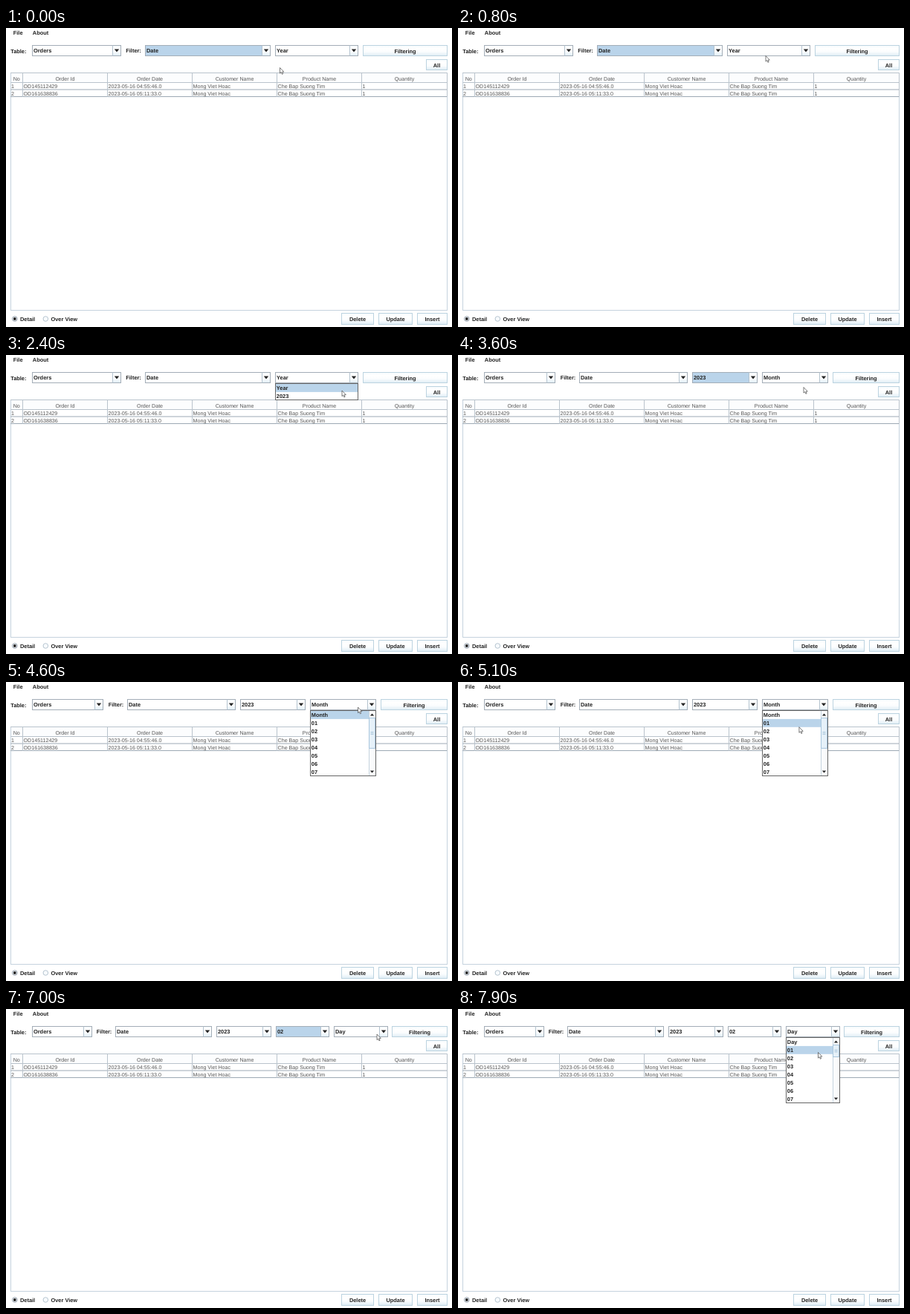
These frames come from a looping animation (600 by 403 pixels, 8 s). An HTML page with a canvas:

```html
<!DOCTYPE html>
<html lang="en">
<head>
<meta charset="utf-8">
<title>Order filter</title>
<style>
html, body { margin: 0; width: 100%; height: 100%; overflow: hidden; background: #fff; }
canvas { display: block; }
</style>
</head>
<body>
<canvas id="stage" width="600" height="403"></canvas>
<script>
const ctx = document.getElementById('stage').getContext('2d');
const LOOP = 8000, STEP = 100, ROW = 10.9;
const INK = '#222', EDGE = '#a3adb7', SELECT = '#bad4ea', PALE = '#c6d3de';
const BOLD = 'bold 7.4px "Liberation Sans", Arial, sans-serif';
const PLAIN = '7.1px "Liberation Sans", Arial, sans-serif';

// Cursor path: time, x, y
const PATH = [
  [0, 368.5, 53.5], [800, 414, 37.5], [1600, 467, 31], [1800, 467, 32],
  [2400, 452, 48], [2900, 441, 56], [3100, 441, 56], [4100, 489, 31],
  [4300, 489, 31], [4600, 473.5, 34], [5200, 456, 66], [5500, 457, 65],
  [7000, 499, 34], [7200, 505, 31], [7400, 505, 32], [7900, 484.5, 58.5]
];

// Each layout: combos as [text, left, right], filter label x, left edge of the button
const LAYOUTS = [
  { combos: [['Orders', 35, 155], ['Date', 187, 356], ['Year', 362, 474]], label: 161.3, button: 480 },
  { combos: [['Orders', 35, 131], ['Date', 163, 309], ['2023', 315, 403], ['Month', 409, 498]], label: 137.7, button: 504 },
  { combos: [['Orders', 35, 116], ['Date', 147, 277], ['2023', 283, 357], ['02', 363, 435], ['Day', 441, 514]], label: 121.8, button: 519 }
];

// Start time, layout, focused combo, open list, total number of items
const STATES = [
  [0, 0, 1], [1700, 0, -1, ['Year', '2023'], 2], [3000, 1, 2],
  [4200, 1, -1, numbered('Month'), 13], [5300, 2, 3], [7300, 2, -1, numbered('Day'), 32]
];

const COLUMNS = [6, 22.5, 136.5, 250.5, 364.5, 478.5, 593.5];
const HEADERS = ['No', 'Order Id', 'Order Date', 'Customer Name', 'Product Name', 'Quantity'];
const ROWS = [
  ['1', 'OD145112429', '2023-05-16 04:55:46.0', 'Mong Viet Hoac', 'Che Bap Suong Tim', '1'],
  ['2', 'OD161638836', '2023-05-16 05:11:33.0', 'Mong Viet Hoac', 'Che Bap Suong Tim', '1']
];

function numbered(first) {
  return [first, ...Array.from({ length: 7 }, (_, i) => '0' + (i + 1))];
}

function text(s, x, mid, font = BOLD, align = 'left') {
  ctx.font = font;
  ctx.textAlign = align;
  ctx.fillStyle = font === BOLD ? INK : '#555';
  ctx.fillText(s, x, mid + 2.6);
}

function box(x1, y1, x2, y2, fill, stroke) {
  ctx.fillStyle = fill;
  ctx.fillRect(x1, y1, x2 - x1, y2 - y1);
  if (!stroke) return;
  ctx.strokeStyle = stroke;
  ctx.lineWidth = 1;
  ctx.strokeRect(x1 + 0.5, y1 + 0.5, x2 - x1 - 1, y2 - y1 - 1);
}

function line(x1, y1, x2, y2, color = EDGE) {
  ctx.strokeStyle = color;
  ctx.lineWidth = 1;
  ctx.beginPath();
  ctx.moveTo(x1, y1);
  ctx.lineTo(x2, y2);
  ctx.stroke();
}

function polygon(points, fill) {
  ctx.beginPath();
  points.forEach(([x, y]) => ctx.lineTo(x, y));
  ctx.closePath();
  ctx.fillStyle = fill;
  ctx.fill();
}

function arrow(x, y, w, h) {
  polygon([[x - w, y - h], [x + w, y - h], [x, y + h]], INK);
}

function shade(y1, y2) {
  const g = ctx.createLinearGradient(0, y1, 0, y2);
  g.addColorStop(0, '#f4fafd');
  g.addColorStop(0.3, '#fff');
  g.addColorStop(0.6, '#fbfdfe');
  g.addColorStop(1, '#dcebf4');
  return g;
}

function button(label, x1, y1, x2, y2) {
  box(x1, y1, x2, y2, shade(y1, y2), '#bcd3e0');
  text(label, (x1 + x2) / 2, (y1 + y2) / 2 + 0.5, BOLD, 'center');
}

function combo([label, x1, x2], focused) {
  box(x1, 23, x2, 38, '#fff', EDGE);
  if (focused) box(x1 + 1, 24, x2 - 12, 37, SELECT);
  box(x2 - 12, 24, x2 - 1, 37, shade(23, 38));
  line(x2 - 11.5, 23.5, x2 - 11.5, 37.5, '#b4c3cf');
  arrow(x2 - 6, 30.5, 3.2, 1.9);
  text(label, x1 + 2, 30.7);
}

function radio(label, x, chosen) {
  ctx.beginPath();
  ctx.arc(x, 392, 3.3, 0, 7);
  ctx.fillStyle = '#f8fbfd';
  ctx.fill();
  ctx.strokeStyle = chosen ? '#7b8a98' : '#a5b7c5';
  ctx.lineWidth = 0.8;
  ctx.stroke();
  if (chosen) {
    ctx.beginPath();
    ctx.arc(x, 392, 1.9, 0, 7);
    ctx.fillStyle = '#222';
    ctx.fill();
  }
  text(label, x + 7.2, 392.5);
}

function table() {
  box(6, 60, 594, 381, '#fff', PALE);
  box(7, 61, 593, 73, '#fcfdfe');
  [60.5, 73.5].forEach(y => line(6, y, 593.5, y, '#b9c3cc'));
  [83, 92.5].forEach(y => line(6, y, 593.5, y, '#9da9b4'));
  COLUMNS.slice(1).forEach(x => line(x, 61, x, 93, '#b9c3cc'));
  HEADERS.forEach((s, i) => text(s, (COLUMNS[i] + COLUMNS[i + 1]) / 2, 68.2, PLAIN, 'center'));
  ROWS.forEach((row, r) =>
    row.forEach((s, i) => text(s, COLUMNS[i] + 1.1, 78.2 + r * 9.8, PLAIN)));
}

function popup([, x1, x2], items, total, y) {
  const bottom = 38.8 + items.length * ROW;
  const scrolls = total > items.length;
  const right = scrolls ? x2 - 10 : x2 - 1;
  const hot = y < 39 ? 0 : Math.min(items.length - 1, Math.floor((y - 39) / ROW));
  box(x1, 38, x2, Math.round(bottom + 0.6), '#fff', '#666');
  box(x1 + 1, 39 + hot * ROW, right, 39 + (hot + 1) * ROW, SELECT);
  items.forEach((s, i) => text(s, x1 + 1.8, 44.8 + i * ROW));
  if (!scrolls) return;
  box(right, 39, x2 - 1, bottom, '#fafbfc');
  line(right + 0.5, 39, right + 0.5, bottom, PALE);
  const size = 68 * items.length / total;
  box(right, 48, x2 - 1, 48 + size, '#e6f1f9', '#a9c6dd');
  for (let i = -1; i < 2; i++) {
    const gripY = 48 + size / 2 + i * 1.6;
    line(right + 2.5, gripY, x2 - 3.5, gripY, '#b4cde0');
  }
  arrow(right + 4.5, 44, 2.6, -1.6);
  arrow(right + 4.5, bottom - 5, 2.6, 1.6);
}

function cursorAt(t) {
  const i = PATH.findIndex(p => p[0] > t);
  if (i < 0) return PATH[PATH.length - 1].slice(1);
  const [t0, x0, y0] = PATH[i - 1], [t1, x1, y1] = PATH[i];
  const k = (t - t0) / (t1 - t0);
  return [x0 + (x1 - x0) * k, y0 + (y1 - y0) * k];
}

function cursor(x, y) {
  const shape = [[0, 0], [0, 7.6], [1.7, 6.1], [2.9, 8.8], [4.1, 8.3], [3, 5.7], [5.3, 5.6]];
  polygon(shape.map(([dx, dy]) => [x + dx, y + dy]), '#fff');
  ctx.strokeStyle = '#444';
  ctx.lineWidth = 0.7;
  ctx.stroke();
}

function draw(t) {
  const [, index, focus, items, total] = STATES.filter(s => s[0] <= t).pop();
  const layout = LAYOUTS[index];
  const [x, y] = cursorAt(t);
  box(0, 0, 600, 403, '#fff');
  text('File', 9.8, 6.2);
  text('About', 35.8, 6.2);
  text('Table:', 6.2, 31.5);
  text('Filter:', layout.label, 30.7);
  layout.combos.forEach((c, i) => combo(c, i === focus));
  button('Filtering', layout.button, 23, 594, 38);
  button('All', 565, 42, 594, 57);
  table();
  radio('Detail', 11.8, true);
  radio('Over View', 53.3, false);
  button('Delete', 451, 384, 495, 400);
  button('Update', 501, 384, 547, 400);
  button('Insert', 553, 384, 594, 400);
  if (items) popup(layout.combos[layout.combos.length - 1], items, total, y);
  cursor(x, y);
}

ctx.textRendering = 'geometricPrecision';
const start = performance.now();

function tick() {
  const t = (performance.now() - start) % LOOP;
  draw(Math.floor(t / STEP) * STEP);
  requestAnimationFrame(tick);
}
tick();
</script>
</body>
</html>
```
